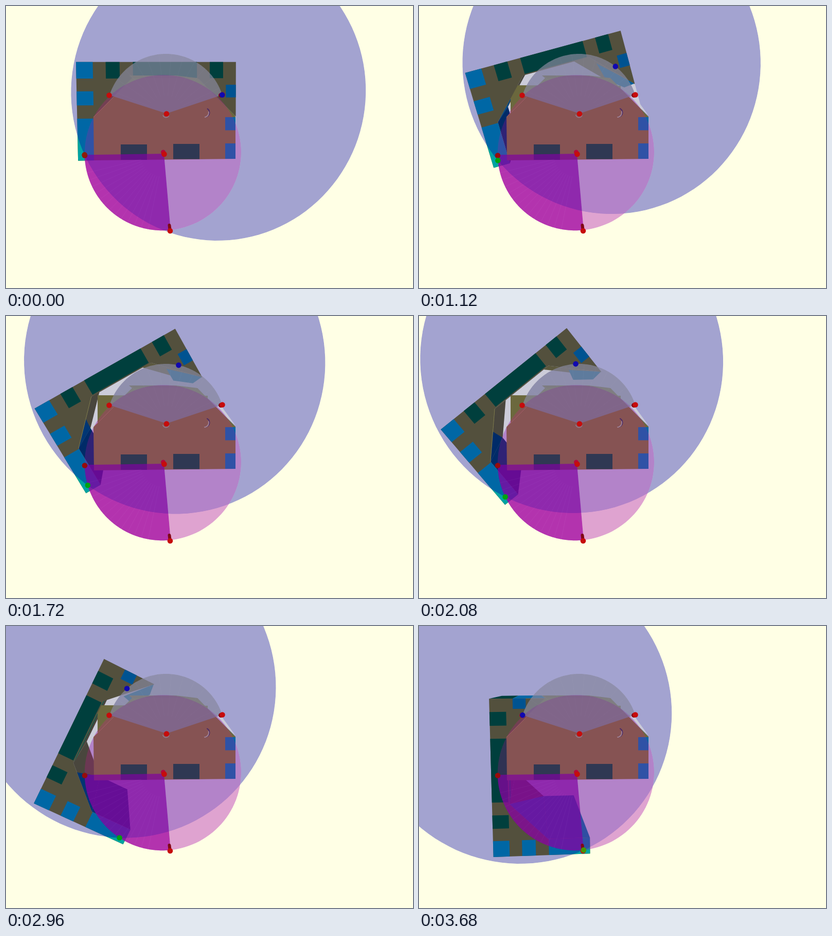
Animation of 791x548 px, one loop 4000 ms. Source, as an HTML page with a canvas:

```html
<!DOCTYPE html>
<html lang="en">
<head>
<meta charset="utf-8">
<title>Four-bar hinge</title>
<style>
html, body { margin: 0; width: 100%; height: 100%; overflow: hidden; background: #ffffe5; }
canvas { display: block; width: 791px; height: 548px; }
</style>
</head>
<body>
<canvas id="stage" width="791" height="548"></canvas>
<script>
const W = 791, H = 548;
const ctx = document.getElementById('stage').getContext('2d');
const layer = document.createElement('canvas');
layer.width = W;
layer.height = H;
const lc = layer.getContext('2d');

// Linkage, in units of the hinge plane
const BLUE_PIVOT = [-83, -65.9], BLUE_ARM = 113.5;
const GREEN_PIVOT = [-88.6, 11.6], GREEN_ARM = 151;
const LINK = 287.4;
const EYE = [-170.9, -151.4];   // foot of the camera on the hinge plane
const BACK = 0.71;              // size of the rear end seen from the front
const FRONT = 0.98;             // the lid lies a little behind the pins
const LAST = 84;
const rad = d => d * Math.PI / 180;
const START = rad(-18), END = rad(-161.6);

const OLIVE = [131, 126, 0], YELLOW = [167, 164, 0], TEAL = [0, 163, 162], GREEN = [0, 100, 0];
const DIM_TEAL = [0, 131, 131];
const rgb = (c, s = 1) => `rgb(${c.map(v => Math.round(v * s)).join()})`;
const lerp = (a, b, t) => a + (b - a) * t;
const mix = (p, q, t) => [lerp(p[0], q[0], t), lerp(p[1], q[1], t)];
const clamp = (v, lo = 0, hi = 1) => Math.min(hi, Math.max(lo, v));
const polar = (c, r, a) => [c[0] + r * Math.cos(a), c[1] + r * Math.sin(a)];

// Perspective of the tilted hinge plane
function project([x, y]) {
  const f = 1377, z = f + 0.1239 * x + 0.1099 * y;
  return [395.5 + f * (0.9924 * x + 0.0012 * y) / z,
          274 + f * (-0.0149 * x + 0.9941 * y) / z];
}
const deep = (p, s = BACK) => mix(EYE, p, s);

function path(points) {
  const p = new Path2D();
  points.forEach(q => p.lineTo(q[0], q[1]));
  p.closePath();
  return p;
}
const planePath = points => path(points.map(project));
const box = (x0, y0, x1, y1) => [[x0, y0], [x1, y0], [x1, y1], [x0, y1]];

function arc(c, r, from = 0, to = 2 * Math.PI) {
  return Array.from({ length: 121 }, (_, i) => polar(c, r, lerp(from, to, i / 120)));
}

// Moving joints
function joints(k) {
  const b = polar(BLUE_PIVOT, BLUE_ARM, lerp(START, END, k / LAST));
  const dx = GREEN_PIVOT[0] - b[0], dy = GREEN_PIVOT[1] - b[1], d = Math.hypot(dx, dy);
  const a = (LINK ** 2 - GREEN_ARM ** 2 + d * d) / (2 * d);
  const h = Math.sqrt(LINK ** 2 - a * a);
  const g = [b[0] + (dx * a - dy * h) / d, b[1] + (dy * a + dx * h) / d];
  return { b, g, hinge: deep(g, FRONT), angle: Math.atan2(b[1] - g[1], b[0] - g[0]) };
}
const home = joints(0), goal = joints(LAST);

// Angle of the green arm, counted from 0 to a full turn
function direction(g) {
  const a = Math.atan2(g[1] - GREEN_PIVOT[1], g[0] - GREEN_PIVOT[0]);
  return a < 0 ? a + 2 * Math.PI : a;
}

// Lid in its closed position
const LID = [[-252, -164], [51.5, -164], [51.5, -59], [-20, -131],
             [-150, -131], [-220, -59], [-220, 22.5], [-252, 22.5]];
const OPENING = [...LID.slice(2, 7), [51.5, 22.5]];
const LID_TILES = [
  [TEAL, -252, -164, -221, -133], [GREEN, -197, -164, -171, -133],
  [GREEN, -146, -164, -24, -133], [GREEN, 0.7, -164, 26.6, -133],
  [DIM_TEAL, 32, -120.4, 51.5, -96], [TEAL, -252, -109, -221, -82.7],
  [TEAL, -252, -57.5, -220, 22.5]
];

// Fixed parts, in pixels
const BODY = path([[170, 216], [209, 176], [245, 140], [372, 140], [446, 215], [446, 297], [171, 300]]);
const BODY_TOP = path([[245, 140], [239, 135], [330, 135], [372, 140]]);
const REAR = path([[178, 154], [392, 155], [392, 297], [178, 299]]);
const GAP = path([[407, 176], [413, 160], [422, 180], [446, 213]]);
const BODY_TILES = [
  [GREEN, path(box(223, 269, 274, 299))], [GREEN, path(box(325, 268, 376, 297.5))],
  [TEAL, path(box(426, 216, 446, 241.5))], [TEAL, path(box(426, 267, 446, 297))]
];
const GREY_FAN = planePath([BLUE_PIVOT, ...arc(BLUE_PIVOT, BLUE_ARM, START, END)]);
const MAGENTA_FAN = planePath([GREEN_PIVOT,
  ...arc(GREEN_PIVOT, GREEN_ARM, direction(home.g), direction(goal.g))]);
const PINK = planePath(arc(GREEN_PIVOT, GREEN_ARM));

function fill(p, color, alpha = 1) {
  ctx.globalAlpha = alpha;
  ctx.fillStyle = color;
  ctx.fill(p);
  ctx.globalAlpha = 1;
}

// Rear side of a translucent slab: open where other parts hide it
function rearSide(shape, color, holes, solids, covers) {
  lc.clearRect(0, 0, W, H);
  lc.save();
  lc.clip(shape);
  lc.fillStyle = color;
  const paint = (mode, list) => {
    lc.globalCompositeOperation = mode;
    list.forEach(p => lc.fill(p));
  };
  paint('source-over', [shape]);
  paint('destination-out', holes);
  paint('source-over', solids);
  paint('destination-out', covers);
  lc.restore();
  ctx.globalAlpha = 0.2;
  ctx.drawImage(layer, 0, 0);
  ctx.globalAlpha = 1;
}

function line(points, color, width = 1) {
  ctx.beginPath();
  points.forEach(q => ctx.lineTo(q[0], q[1]));
  ctx.strokeStyle = color;
  ctx.lineWidth = width;
  ctx.stroke();
}

function pin([x, y], color, dx = 0, dy = 0, shade = color) {
  ctx.lineCap = 'round';
  if (dx || dy) line([[x, y], [x + dx, y + dy]], shade, 9);
  ctx.beginPath();
  ctx.arc(x, y, 5.3, 0, 7);
  ctx.fillStyle = color;
  ctx.fill();
}

function crescent(x, y, r, from, to, color) {
  ctx.beginPath();
  ctx.arc(x, y, r, from, to);
  ctx.strokeStyle = color;
  ctx.lineWidth = 1.8;
  ctx.stroke();
}

function streaks(pivot, r, from, to, n, color) {
  for (let i = 0; i < n; i++) {
    const a = lerp(from, to, (i + 0.6) / n);
    line([project(polar(pivot, r * 0.3, a)), project(polar(pivot, r, a))], color);
  }
}

function draw(k) {
  const { b, g, hinge, angle } = joints(k);
  const c = Math.cos(angle - home.angle), s = Math.sin(angle - home.angle);
  const place = ([x, y]) => {
    const dx = x - home.hinge[0], dy = y - home.hinge[1];
    return [hinge[0] + c * dx - s * dy, hinge[1] + s * dx + c * dy];
  };
  const solids = [];
  const solid = (p, color) => { solids.push(p); fill(p, color); };

  // Side face of the lid, if it is turned to the camera
  const wall = (p, q, color, depth = BACK) => {
    const a = place(p), e = place(q);
    const side = (e[0] - a[0]) * (EYE[1] - a[1]) - (e[1] - a[1]) * (EYE[0] - a[0]);
    if (side < 0) solid(planePath([a, e, deep(e, depth), deep(a, depth)]), color);
    return side < 0;
  };

  fill(path(box(0, 0, W, H)), '#ffffe5');

  const turn = clamp(k / 44), late = clamp((k - 44) / 40);
  const glow = lerp(0.42, 0.95, clamp((k - 62) / 22));
  wall(LID[1], [51.5, -120], rgb(GREEN));
  wall([51.5, -120], LID[2], rgb(TEAL));
  wall(LID[2], LID[3], rgb(OLIVE, 1.1));
  wall(LID[3], LID[4], rgb(OLIVE, 0.85));
  wall(LID[3], LID[4], rgb([0, 150, 20]), 0.93);
  if (wall(LID[4], LID[5], rgb(OLIVE, 0.88))) {
    const p = place(LID[4]), q = place(LID[5]);
    const edge = mix(p, q, lerp(0.43, 0, late));
    solid(planePath([edge, deep(q), q]), rgb(TEAL, Math.max(glow, lerp(0.95, 0.42, turn))));
  }
  wall(LID[5], LID[6], rgb(TEAL, glow));
  if (k > 2 && k < 80) {
    const tip = [[lerp(-22, 5, turn), lerp(-130, -101, turn)], [51, -60], [30, -58], [0, -81]];
    solid(planePath(tip.map(place)), rgb(TEAL, 0.92));
  }

  solid(REAR, rgb(YELLOW));
  solid(planePath(LID.map(place)), rgb(OLIVE));
  for (const [color, ...r] of LID_TILES) fill(planePath(box(...r).map(place)), rgb(color));
  if (k > 20 && k < 60) {
    line([LID[4], LID[5]].map(p => project(place(p))), 'rgb(190,185,20)');
  }
  solid(BODY_TOP, rgb(YELLOW, 0.95));
  solid(BODY, rgb(YELLOW));
  for (const [color, p] of BODY_TILES) fill(p, rgb(color, color === GREEN ? 1.1 : 1));
  line([[170, 216], [209, 177]], 'rgb(225,180,40)');

  fill(GREY_FAN, 'rgb(156,156,156)', 0.76);
  fill(MAGENTA_FAN, 'rgb(158,0,158)', 0.75);
  streaks(GREEN_PIVOT, GREEN_ARM, rad(170), rad(100), 13, 'rgba(255,225,255,.07)');
  streaks(BLUE_PIVOT, BLUE_ARM, START, END, 12, 'rgba(255,255,255,.04)');

  const pink = 'rgb(167,0,170)', blue = 'rgb(0,0,170)';
  rearSide(PINK, pink, [], [], [GREY_FAN, MAGENTA_FAN]);
  fill(PINK, pink, 0.2);

  const disc = planePath(arc(b, LINK));
  rearSide(disc, blue, [planePath(OPENING.map(place)), GAP], solids, [PINK, GREY_FAN]);
  fill(disc, blue, 0.2);

  crescent(387, 207, 8.5, -1.1, 1.5, 'rgb(72,42,105)');
  crescent(385.5, 207.5, 8.5, -0.3, 1.5, 'rgb(165,135,150)');
  crescent(311, 210, 6.5, 0.5, 2.8, 'rgb(150,118,135)');

  const red = 'rgb(198,12,12)', dark = 'rgb(128,8,22)';
  pin([153, 290.5], 'rgb(150,12,12)');
  pin([200.5, 173.5], red);
  pin([420.5, 172.5], red, -3, 1, dark);
  pin([312, 209.5], red);
  pin([307.5, 288], red, -2, -4, 'rgb(178,8,60)');
  ctx.lineCap = 'round';
  line([[317.5, 426], [318.5, 434]], dark, 6);
  pin([319, 437], red);
  pin(project(b), 'rgb(16,8,176)');
  if (k === 0) pin(project(g), 'rgb(140,28,8)');
  else pin(project(g), k < 12 ? 'rgb(104,58,8)' : k > 82 ? 'rgb(72,150,0)' : 'rgb(0,162,16)');
}

let shown = -1;
const origin = performance.now();
function tick() {
  const t = (performance.now() - origin) % 4000;
  const k = clamp(Math.floor(t / 40) - 8, 0, LAST);
  if (k !== shown) draw(shown = k);
  requestAnimationFrame(tick);
}
tick();
</script>
</body>
</html>
```
